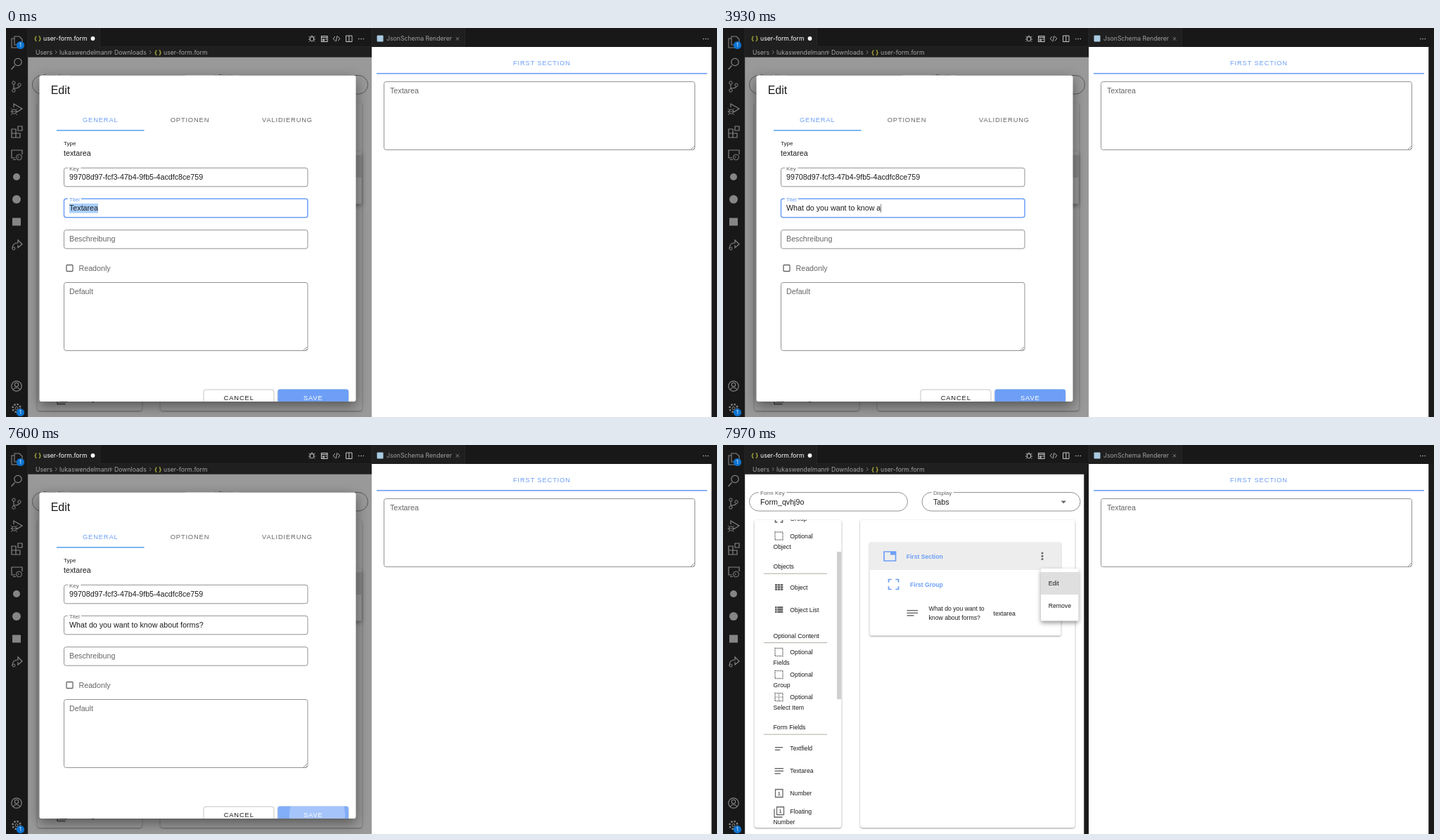
Write an HTML page that moves like this. It is 1011 px wide and 554 px high and loops after 8000 ms.

```html
<!DOCTYPE html>
<html lang="en">
<head>
<meta charset="utf-8">
<title>Form editor</title>
<style>
  html, body { margin: 0; width: 100%; height: 100%; overflow: hidden; background: #181818; }
  svg { display: block; width: 1011px; height: 554px; }
  text { font-family: "Liberation Sans", Arial, sans-serif; white-space: pre; }
  .ui { font-family: Inter, sans-serif; }
  .caps { letter-spacing: .0893em; }
  .label { paint-order: stroke; stroke: #fff; stroke-width: 5px; }
  .card { fill: #fff; filter: drop-shadow(0 1px 1.2px rgba(0,0,0,.4)); }
  .menu { fill: #fff; filter: drop-shadow(0 3px 3px rgba(0,0,0,.4)); }
  .dialog { fill: #fff; filter: drop-shadow(0 6px 9px rgba(0,0,0,.45)); }
</style>
</head>
<body>
<svg id="stage" viewBox="0 0 1011 554"></svg>
<script>
const BLUE = '#6d9ff7', GREY = '#666', LINE = '#929292', INK = '#1c1c1c';
const TITLE = 'What do you want to know about forms?';
// [time, characters typed]
const KEYS = [[0, 0], [1050, 10], [2600, 19], [2700, 20], [2900, 20], [5200, 34], [5370, 35], [5600, 36], [5830, 37]];
const LOOP = 8000, HOVER = 7270, PRESS = 7430, CLOSE = 7611;

const text = (x, y, s, size = 8.7, fill = INK, more = '') =>
  `<text x="${x}" y="${y}" font-size="${size}" fill="${fill}" ${more}>${s}</text>`;
const ui = (x, y, s, fill = '#a5a5a5', more = '') => text(x, y, s, 8.7, fill, `class="ui" ${more}`);
const caps = (x, y, s, fill = GREY, more = '') => text(x, y, s, 9.37, fill, `class="caps" ${more}`);
const rect = (x, y, w, h, fill, more = '') =>
  `<rect x="${x}" y="${y}" width="${w}" height="${h}" fill="${fill}" ${more}/>`;
const path = (d, color, width = 1, more = '') =>
  `<path d="${d}" fill="none" stroke="${color}" stroke-width="${width}" ${more}/>`;
const disc = (x, y, r, fill, more = '') => `<circle cx="${x}" cy="${y}" r="${r}" fill="${fill}" ${more}/>`;
const dots = (x, y, dx, dy, r, fill) => [-1, 0, 1].map(i => disc(x + i * dx, y + i * dy, r, fill)).join('');
const group = (id, body, more = '') => `<g id="${id}" ${more}>${body}</g>`;
const label = (x, y, s, more = '') => text(x, y, s, 8, GREY, `class="label" ${more}`);
const box = (x, y, w, h, r = 3, more = '') => rect(x, y, w, h, 'none', `rx="${r}" stroke="${LINE}" ${more}`);
const grip = (x, y) => path(`M${x - 6} ${y - 1}l5-5M${x - 3} ${y - 1}l2-2`, '#777', .8);
const lines = (x, y, n, w) => Array.from({length: n}, (_, i) =>
  rect(x, y + i * 3.6, i == n - 1 ? w * .65 : w, 1.4, GREY)).join('');

function activityBar() {
  const c = '#858585';
  const badge = y => disc(20.5, y, 5.6, '#0b72cf') + ui(20.5, y + 2.6, '1', '#fff', 'text-anchor="middle" style="font-size:7px"');
  return rect(0, 0, 31, 554, '#181818') + rect(30.5, 0, .7, 554, '#2b2b2b') +
    path('M12 12h7l4 4v8H12zM12 15H8v13h10v-4', c, 1.1) + badge(24.5) +
    path('M12.500 53.500l-5 5.500', c, 1.3) + disc(17, 48.500, 5.200, 'none', `stroke="${c}" stroke-width="1.200"`) +
    [[11, 78], [11, 89], [19, 81]].map(p => disc(...p, 2.2, 'none', `stroke="${c}"`)).join('') +
    path('M11 80v7M19 83q0 3-8 3', c, 1.1) +
    path('M11 113v-5l12 7-8 5', c, 1.2) + disc(11.500, 119, 3.200, 'none', `stroke="${c}"`) +
    path('M6.500 119h10M7 114.500l2 2M16 114.500l-2 2M7 124l2-2M16 124l-2-2', c, .9) +
    path('M8 144h6v12H8zM8 150h12v6H8M17 140h6v6h-6z', c, 1.2) +
    path('M13 185H8v-11h15v6M10 187.500h4', c, 1.2) + disc(18.500, 184, 4, 'none', `stroke="${c}"`) +
    path('M16.500 182.500l2 1.500-2 1.500', c, .8) +
    disc(15, 212, 5, c) + disc(15, 244, 6, c) + rect(9, 270.500, 12, 11, c) +
    path('M9 314q0-8 8-8v-4l6 6-6 5v-4', c, 1.2) + disc(11, 314, 2, 'none', `stroke="${c}"`) +
    disc(15, 510, 7.2, 'none', `stroke="${c}" stroke-width="1.2"`) + disc(15, 508, 2.7, 'none', `stroke="${c}" stroke-width="1.1"`) +
    path('M10 515q5-6 10 0', c, 1.1) +
    disc(15, 541.500, 5.5, 'none', `stroke="${c}" stroke-width="2.5" stroke-dasharray="2.300 2"`) +
    disc(15, 541.500, 2, 'none', `stroke="${c}"`) + badge(547.500);
}

function editorBars() {
  const c = '#c5c5c5', braces = (x, y) => ui(x, y, '{ }', '#cbcb41', 'font-weight="600"');
  const crumbs = [[42, 'Users'], [76, 'lukaswendelmann'], [154, 'Downloads'], [224, 'user-form.form']];
  return rect(31, 0, 980, 27, '#181818') + rect(31, 0, 102, 27, '#1f1f1f') + rect(31, 27, 489, 14.500, '#1f1f1f') +
    rect(133, 0, .7, 27, '#2b2b2b') + rect(133, 26.3, 387, .7, '#2b2b2b') +
    braces(40, 18) + ui(53, 18, 'user-form.form', '#fff') + disc(123.500, 15, 2.9, '#fff') +
    crumbs.map(([x, s]) => ui(x, 37.5, s)).join('') +
    [71, 149.500, 204].map((x, i) => path(`M${x - (i ? 0 : 1)} 32l2.300 2.500-2.300 2.500`, '#888', .9, i == 1 ? 'transform="translate(-1)"' : '')).join('') +
    braces(211, 37.5) +
    path('M432.500 13h5v4q-2.500 4-5 0zM433 13q2-4 4 0M430.500 12l2 1.500M439.500 12l-2 1.500M430 16h2.500M437.500 16h2.500M431 19.500l2-2M439 19.500l-2-2', c, .9) +
    path('M448.500 11.500h8.500v8h-8.500zM448.500 13.500h8.500M450.500 16h2v2h-2zM454 16h2', c, 1.1) +
    path('M468 12l-2.700 3.200 2.700 3.200M472 12l2.700 3.200-2.700 3.200M471 11l-2 8.500', c, .9) +
    path('M483.500 11h8.500v8.500h-8.500zM487.800 11v8.500', c, 1) +
    dots(505, 15.500, 3.3, 0, .8, c) + dots(995, 15.500, 3.3, 0, .8, c) +
    rect(520, 0, 132, 27, '#1f1f1f') + rect(519.7, 0, .6, 27, '#333') + rect(652, 0, .7, 27, '#2b2b2b') +
    rect(527.500, 10.500, 9, 9, '#a9cbe2', 'rx="1"') + ui(541, 18, 'JsonSchema Renderer', '#a0a0a0') +
    path('M639.700 13l4.600 4.600M644.300 13l-4.600 4.600', '#999', .8);
}

function preview() {
  return rect(520, 27, 483.500, 527, '#fff') + rect(1003.500, 27, 8, 527, '#1a1a1a') +
    caps(721, 52.8, 'FIRST SECTION', BLUE) + rect(527, 64, 470, 1.6, BLUE) +
    box(537.500, 76.500, 442, 97) + text(546, 93, 'Textarea', 10.7, GREY) + grip(980, 174);
}

const menu = () => rect(452, 176, 53.5, 74.500, '#fff', 'class="menu" rx="2"') + rect(452, 181, 53.5, 32, '#dfdfdf') +
  text(462.7, 200, 'Edit') + text(462.7, 232, 'Remove');

const floatingIcon = y => path(`M76.500 ${y}h10v11h-10zM73 ${y + 2.500}v12h11.500`, GREY, 1.3) +
  text(81.500, y + 8.700, '1', 8, GREY, 'text-anchor="middle" font-weight="700"');

const expand = (x, y, s, color) => {
  const k = s * .3, e = s - k;
  return path(`M${x} ${y + k}v${-k}h${k}M${x + e} ${y}h${k}v${k}M${x + s} ${y + e}v${k}h${-k}M${x + k} ${y + s}h${-k}v${-k}`, color, 1.7);
};

function palette() {
  const dotted = y => rect(74, y, 11, 11, 'none', `stroke="${GREY}" stroke-width="1.4" stroke-dasharray="1.4 1"`);
  const option = (y, name) => dotted(y - 8.500) + text(95.3, y, 'Optional') + text(71.5, y + 15.4, name);
  const heading = (y, s) => text(71.5, y, s) + rect(58, y + 6.7, 90, .9, '#a5a596');
  const cells = (y, cols) => cols.map(([x, w]) => [0, 1, 2].map(i => rect(x, y + i * 3.200, w, 2.600, GREY)).join('')).join('');
  return expand(74.500, 100, 10, GREY) + text(95.3, 107.5, 'Group') + option(132.5, 'Object') +
    heading(176, 'Objects') + cells(198, [[74, 3.3], [78, 3.3], [82, 3.3]]) + text(95.3, 205.5, 'Object') +
    cells(230, [[74, 2.6], [77.3, 8]]) + text(95.3, 237.5, 'Object List') +
    heading(274.5, 'Optional Content') + option(298, 'Fields') + option(330, 'Group') + option(362, 'Select Item') +
    path('M74 359h11M79.500 354v11', GREY, 1.2, 'stroke-dasharray="1.3 1"') +
    heading(405, 'Form Fields') + lines(74, 430, 2, 11) + text(95.3, 435, 'Textfield') +
    lines(73.500, 460, 3, 12.500) + text(95.3, 467, 'Textarea') +
    path('M74.500 490.500h10.500v11H74.500z', GREY, 1.3) + text(79.700, 499, '1', 8, GREY, 'text-anchor="middle" font-weight="700"') +
    text(95.3, 499, 'Number') + floatingIcon(515.500) + text(95.3, 525, 'Floating') + text(71.5, 540.4, 'Number') +
    rect(162, 152, 6.5, 210, '#cfcfcf');
}

function page() {
  const bold = 'font-weight="700"';
  return rect(31, 41.500, 482.500, 513, '#fff') +
    box(37.500, 67.500, 225, 26.500, 13.2) + label(53, 71, 'Form Key') + text(53, 84.7, 'Form_qvhj9o', 10.7) +
    box(283, 67.500, 225, 26.500, 13.2) + label(299, 71, 'Display') + text(299, 84.7, 'Tabs', 10.7) +
    '<path d="M480.500 79.500h7.500l-3.700 3.800z" fill="#666"/>' +
    rect(44.500, 106.500, 124, 438.500, '#fff', 'class="card" rx="4"') + group('palette', palette(), 'clip-path="url(#paletteClip)"') +
    rect(195, 106.500, 305.500, 438.500, '#fff', 'class="card" rx="4"') +
    rect(208.500, 138.500, 272, 133, '#fff', 'class="card" rx="2"') + rect(208.500, 138.500, 272, 39.500, '#ededed') +
    path('M229 152h16.500v13H229z', BLUE, 1.7) + rect(238, 152, 8, 4.500, BLUE) +
    text(260.7, 162, 'First Section', 8.6, BLUE, bold) + dots(454, 158.300, 0, 4.300, 1.5, GREY) +
    expand(235.500, 191.500, 14, BLUE) + text(266, 202, 'First Group', 8.6, BLUE, bold) +
    lines(261.500, 235, 3, 15.500) + text(292.5, 236, 'What do you want to') + text(292.5, 249.3, 'know about forms?') +
    text(384.5, 242.8, 'textarea') + menu();
}

// The page while the dialog covers it: no scrollbar, so slightly wider
function coveredPage() {
  return rect(31, 41.500, 489, 513, '#fff') +
    box(37.500, 67.500, 228, 26.500, 13.2) + label(53, 71, 'Form Key') +
    box(286.500, 67.500, 228, 26.500, 13.2) + label(302, 71, 'Display') +
    rect(44.500, 106.500, 149, 438.500, '#fff', 'class="card" rx="4"') + rect(219.500, 106.500, 287, 438.500, '#fff', 'class="card" rx="4"') +
    floatingIcon(521) + text(95.3, 531, 'Floating') + menu();
}

function dialog() {
  return rect(47.500, 67.500, 450, 464.500, '#fff', 'class="dialog" rx="3"') +
    text(63.7, 94.3, 'Edit', 16) +
    caps(109, 133.7, 'GENERAL', BLUE) + caps(233.7, 133.7, 'OPTIONEN') + caps(364, 133.7, 'VALIDIERUNG') +
    rect(72, 145, 124.500, 1.6, '#5ca6ee') +
    text(82, 167, 'Type', 8) + text(82, 182, 'textarea', 10.7) +
    box(82.500, 199.300, 346.500, 26.500) + label(90, 202.5, 'Key') + text(90, 216, '99708d97-fcf3-47b4-9fb5-4acdfc8ce759', 10.7) +
    box(82.500, 243.300, 346.500, 26.500, 3, 'id="field"') + label(90, 246.7, 'Titel', 'id="fieldLabel"') +
    rect(90, 250, 41, 13.500, '#a9cffc', 'id="selection"') + text(90, 260.3, '', 10.7, INK, 'id="typed"') +
    rect(90, 250.500, .8, 12.500, '#333', 'id="caret"') +
    box(82.500, 287.700, 346.500, 26.500) + text(90, 304.3, 'Beschreibung', 10.7, GREY) +
    rect(86, 337.500, 9, 9, 'none', `stroke="${GREY}" stroke-width="1.3" rx="1"`) + text(103.5, 345.7, 'Readonly', 10.7, GREY) +
    box(82.500, 362.500, 346.500, 97) + text(90, 379, 'Default', 10.7, GREY) + grip(429, 460) +
    group('buttons',
      rect(281, 515, 100, 24, '#fff', 'rx="3" stroke="#c4c4c4"') + caps(309.7, 529.8, 'CANCEL', INK) +
      rect(386.500, 514.500, 100.500, 24, BLUE, 'rx="3" style="filter:drop-shadow(0 1px 1px rgba(0,0,0,.3))"') +
      rect(386.500, 514.500, 100.500, 24, '#fff', 'id="hover" rx="3" opacity="0"') +
      disc(442.500, 527, 0, '#fff', 'id="ripple" opacity=".28" clip-path="url(#saveClip)"') +
      caps(423, 529.8, 'SAVE', '#fff'), 'clip-path="url(#dialogClip)"');
}

const clip = (id, x, y, w, h) => `<clipPath id="${id}">${rect(x, y, w, h, '#000')}</clipPath>`;
const $ = id => document.getElementById(id);
$('stage').innerHTML =
  `<defs>${clip('paletteClip', 44.500, 106.500, 124, 438)}${clip('dialogClip', 47.500, 500, 450, 32)}${clip('saveClip', 386.500, 514.500, 100.500, 18)}</defs>` +
  rect(0, 0, 1011, 554, '#181818') + group('page', page()) + group('covered', coveredPage()) +
  rect(31, 41.500, 489, 513, '#000', 'id="scrim"') + group('strip', rect(513.500, 41.500, 6.500, 513, '#1a1a1a')) +
  group('dialog', dialog()) + preview() + editorBars() + activityBar();

const clamp = u => Math.min(1, Math.max(0, u));
const show = (id, on) => $(id).setAttribute('visibility', on ? 'visible' : 'hidden');
const set = (id, name, value) => $(id).setAttribute(name, value);

// cubic-bezier(.4, 0, .2, 1)
function ease(u) {
  let lo = 0, hi = 1, s;
  for (let i = 0; i < 20; i++) {
    s = (lo + hi) / 2;
    const x = 1.2 * s * (1 - s) ** 2 + .6 * s * s * (1 - s) + s ** 3;
    if (x < u) lo = s; else hi = s;
  }
  return s * s * (3 - 2 * s);
}

function typedCount(t) {
  const i = KEYS.findIndex(k => k[0] > t);
  if (i < 0) return TITLE.length;
  const [t0, n0] = KEYS[i - 1], [t1, n1] = KEYS[i];
  return Math.floor(n0 + (n1 - n0) * (t - t0) / (t1 - t0));
}

function draw(t) {
  const n = typedCount(t), focus = t < PRESS, closed = t >= CLOSE;
  $('typed').textContent = n ? TITLE.slice(0, n) : 'Textarea';
  show('selection', !n);
  set('caret', 'x', 90 + $('typed').getComputedTextLength());
  const idle = t - KEYS[KEYS.length - 1][0];
  set('caret', 'opacity', n && focus && (idle < 0 || idle % 1000 < 500) ? .7 : 0);
  set('field', 'stroke', focus ? BLUE : LINE);
  set('field', 'stroke-width', focus ? 1.5 : 1);
  set('fieldLabel', 'fill', focus ? BLUE : GREY);

  set('hover', 'opacity', .14 * clamp((t - HOVER) / 200));
  set('ripple', 'r', t < PRESS ? 0 : 12 + 28 * ease(clamp((t - PRESS) / 200)));

  const leave = clamp((t - CLOSE) / 125) ** 2;
  const scale = 1 - leave / 2;
  set('dialog', 'transform', `translate(272 299.500) scale(${scale}) translate(-272 -299.500)`);
  set('dialog', 'opacity', 1 - leave);
  set('scrim', 'opacity', .4 * (1 - ease(clamp((t - CLOSE) / 200))));
  show('page', closed);
  show('covered', !closed);
  show('strip', closed);
}

function tick() {
  draw(performance.now() % LOOP);
  requestAnimationFrame(tick);
}
tick();
</script>
</body>
</html>
```
